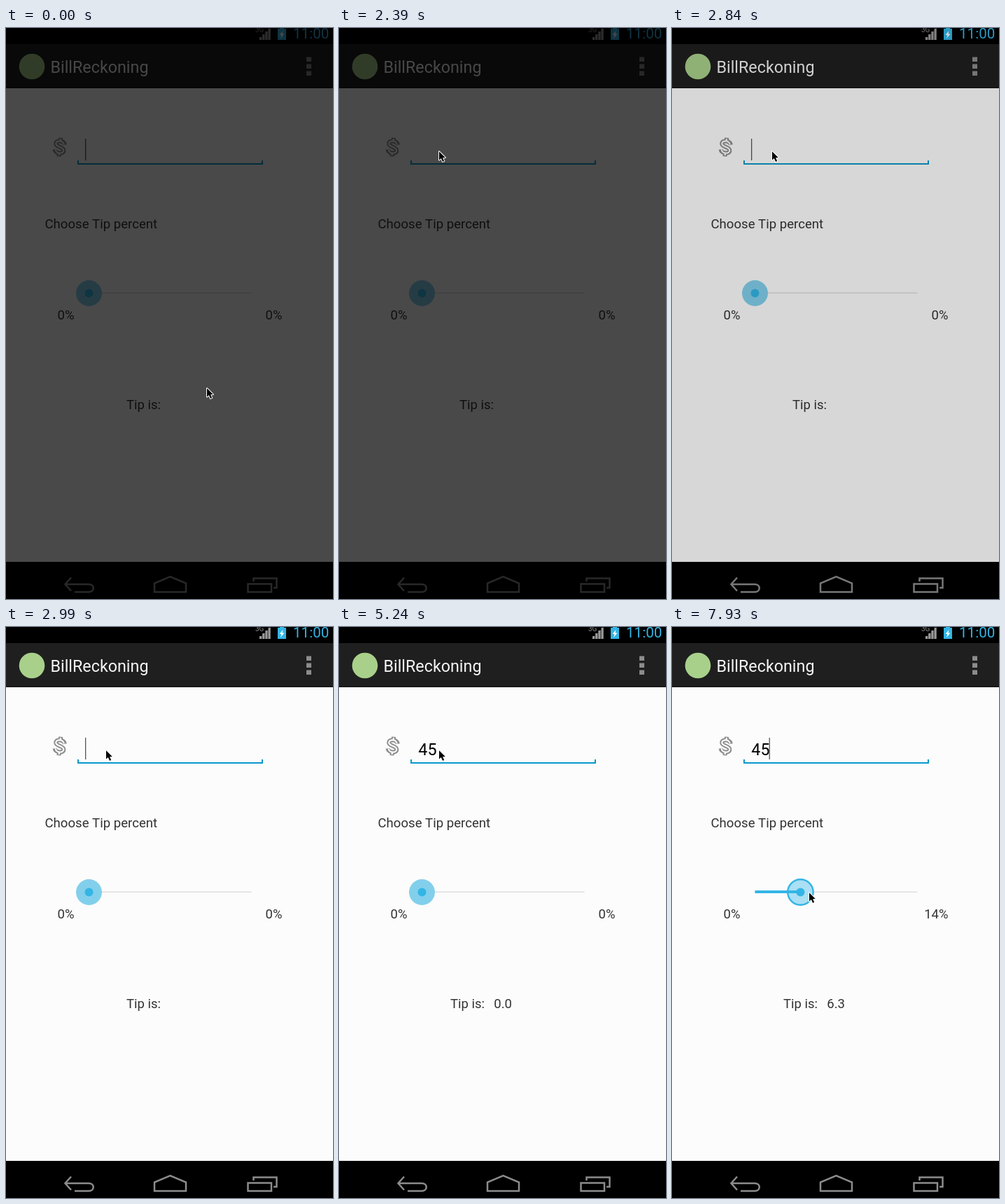
An HTML page with a canvas that plays this animation: 467 px wide and 815 px high, repeating every 8000 ms.

```html
<!DOCTYPE html>
<html lang="en">
<head>
<meta charset="utf-8">
<title>Tip screen</title>
<style>
html, body { margin: 0; width: 100%; height: 100%; overflow: hidden; background: #000; }
canvas { display: block; width: 467px; height: 815px; }
</style>
</head>
<body>
<canvas id="stage"></canvas>
<script>
const W = 467, H = 815, LOOP = 8000, STEP = 149.6;
const BLUE = '#33b5e5', LINE = '#0a98cb', PAGE = '#fcfcfc', GREY = '#8c8c8c', INK = '#333';
const RAIL = { left: 118.5, y: 378.5, width: 232, max: 50 };
const TYPE_FIRST = 30, TYPE_SECOND = 32, PRESS = 44;

const canvas = document.getElementById('stage');
const ctx = canvas.getContext('2d');
const ratio = window.devicePixelRatio || 1;
canvas.width = W * ratio;
canvas.height = H * ratio;

// The picture advances in steps; each glide eases the pointer to a new place
const start = { x: 286, y: 513 };
const glides = [
  { from: 0, to: 5, x: 256, y: 405, bow: 0 },
  { from: 11, to: 16, x: 142, y: 175, bow: 0 },
  { from: 37, to: 43, x: 131, y: 378, bow: 16 },
  { from: PRESS, to: 50, x: 195, y: 378, bow: 0 }
];

const clamp = (v, lo, hi) => Math.min(hi, Math.max(lo, v));
const ease = u => u * u * (3 - 2 * u);

function pointerAt(step) {
  let { x, y } = start;
  for (const g of glides) {
    const u = ease(clamp((step - g.from) / (g.to - g.from), 0, 1));
    x += (g.x - x) * u + g.bow * Math.sin(Math.PI * u);
    y += (g.y - y) * u;
  }
  return { x: Math.round(x), y: Math.round(y) };
}

function stateAt(t) {
  const step = Math.floor((t + 8) / STEP);
  const pointer = pointerAt(step);
  const pressed = step >= PRESS;
  const reach = (pointer.x - 131) / RAIL.width * RAIL.max;
  const blink = step < TYPE_FIRST ? step + 2 : Math.max(step - TYPE_FIRST - 1, 0);
  return {
    pointer, pressed,
    percent: pressed ? 2 * Math.round(reach / 2) : 0,
    amount: '45'.slice(0, (step >= TYPE_FIRST) + (step >= TYPE_SECOND)),
    caret: blink % 7 < 4,
    dim: clamp(.71 - .28 * (step - 17), 0, .71)
  };
}

function box(x, y, w, h, color) {
  ctx.fillStyle = color;
  ctx.fillRect(x, y, w, h);
}

function disc(x, y, r, color) {
  ctx.fillStyle = color;
  ctx.beginPath();
  ctx.arc(x, y, r, 0, Math.PI * 2);
  ctx.fill();
}

function poly(points, close) {
  ctx.beginPath();
  points.forEach(([x, y]) => ctx.lineTo(x, y));
  if (close) ctx.closePath();
}

function label(text, x, y, size = 18.5, color = INK, align = 'left') {
  ctx.font = `${size}px Roboto, "Noto Sans", sans-serif`;
  ctx.textAlign = align;
  ctx.fillStyle = color;
  ctx.fillText(text, x, y);
}

function statusBar() {
  box(0, 0, W, 23, '#000');
  label('3G', 356, 6, 10, '#888');
  ctx.fillStyle = '#3a3a3a';
  poly([[361, 17], [378, 0], [378, 17]], true);
  ctx.fill();
  for (let i = 0; i < 4; i++) box(362 + i * 4.2, 13 - i * 4, 3, 4 + i * 4, '#999');
  box(388, 1, 12, 16, BLUE);
  box(391, 0, 6, 2, BLUE);
  ctx.fillStyle = '#fff';
  poly([[395.5, 4], [390.5, 10], [393.5, 10], [392, 15], [397.5, 8.5], [394.5, 8.5]], true);
  ctx.fill();
  label('11:00', 410, 15, 20.6, BLUE);
}

function actionBar() {
  box(0, 23, W, 63, '#1f1f1f');
  box(0, 84.5, W, 1.5, '#151515');
  disc(37, 55, 18.3, '#a8d08a');
  label('BillReckoning', 63.5, 64, 23.3, '#f5f5f5');
  for (let i = 0; i < 3; i++) box(429, 41.5 + i * 10, 7, 6.5, GREY);
}

function dollar() {
  const trace = (color, width, grow) => {
    ctx.strokeStyle = color;
    ctx.lineWidth = width;
    ctx.beginPath();
    ctx.moveTo(6 + grow, -4);
    ctx.bezierCurveTo(5, -10, -6, -10, -6, -4.5);
    ctx.bezierCurveTo(-6, 1, 6, -1.5, 6, 4.5);
    ctx.bezierCurveTo(6, 10, -5.5, 10, -6 - grow, 4);
    for (const side of [-1, 1]) {
      ctx.moveTo(0, side * 8);
      ctx.lineTo(0, side * (12.5 + grow));
    }
    ctx.stroke();
  };
  ctx.save();
  ctx.translate(76.8, 170);
  ctx.rotate(.1);
  trace(GREY, 6, .8);
  trace(PAGE, 2.2, -.6);
  ctx.restore();
}

function field(amount, caret) {
  dollar();
  box(102, 193, 265, 2, LINE);
  for (const x of [102, 365]) box(x, 189, 2, 5, LINE);
  label(amount, 113.3, 183, 23.3, '#000');
  if (caret) box(113 + amount.length * 12.8, 158, 1.3, 31, '#555');
}

function slider(percent, pressed) {
  const { left, y, width, max } = RAIL;
  const x = left + percent / max * width;
  box(left, y - 1, width, 1.5, '#dedede');
  disc(x, y, 18.5, pressed ? '#aadff4' : '#82cfec');
  if (pressed) {
    ctx.strokeStyle = BLUE;
    ctx.lineWidth = 2.4;
    ctx.beginPath();
    ctx.arc(x, y, 18.2, 0, Math.PI * 2);
    ctx.stroke();
  }
  box(left, y - 2.5, x - left, 4, BLUE);
  disc(x, y, 6, BLUE);
}

function navBar() {
  box(0, 762, W, 53, '#000');
  ctx.save();
  ctx.translate(0, -1);
  ctx.strokeStyle = GREY;
  ctx.lineWidth = 2.5;
  ctx.lineJoin = 'miter';
  poly([[93, 785.5], [84.5, 795], [93, 804.5]]);
  ctx.moveTo(85, 795);
  ctx.lineTo(118, 795);
  ctx.bezierCurveTo(127, 795, 127, 806, 118, 806);
  ctx.lineTo(98, 806);
  ctx.stroke();
  poly([[212, 806], [212, 793.5], [234.5, 784], [257, 793.5], [257, 806]], true);
  ctx.stroke();
  ctx.strokeRect(345.5, 794.5, 33.5, 11.5);
  poly([[353.5, 791], [353.5, 786.5], [386.5, 786.5], [386.5, 800], [382, 800]]);
  ctx.stroke();
  ctx.restore();
}

function arrow({ x, y }) {
  ctx.save();
  ctx.translate(x, y);
  poly([[1, 1.2], [1, 13.6], [3.8, 11], [6, 15.8], [8.2, 14.9], [6.1, 10.3], [9.8, 10]], true);
  ctx.lineJoin = 'round';
  ctx.lineWidth = 2;
  ctx.strokeStyle = '#fff';
  ctx.stroke();
  ctx.fillStyle = '#000';
  ctx.fill();
  ctx.restore();
}

function draw(t) {
  const { pointer, pressed, percent, amount, caret, dim } = stateAt(t);
  ctx.setTransform(ratio, 0, 0, ratio, 0, 0);
  box(0, 0, W, H, PAGE);
  statusBar();
  actionBar();
  field(amount, caret);
  label('Choose Tip percent', 55.5, 285.5, 18.6);
  slider(percent, pressed);
  label('0%', 73.5, 416);
  label(percent + '%', 394.5, 416, 18.5, INK, 'right');
  label('Tip is:', amount ? 159 : 172, 543.5);
  if (amount) label((amount * percent / 100).toFixed(1), 221.3, 543.5);
  navBar();
  box(0, 0, W, H, `rgba(0,0,0,${dim})`);
  arrow(pointer);
}

function tick(now) {
  draw(now % LOOP);
  requestAnimationFrame(tick);
}
draw(0);
requestAnimationFrame(tick);
</script>
</body>
</html>
```
